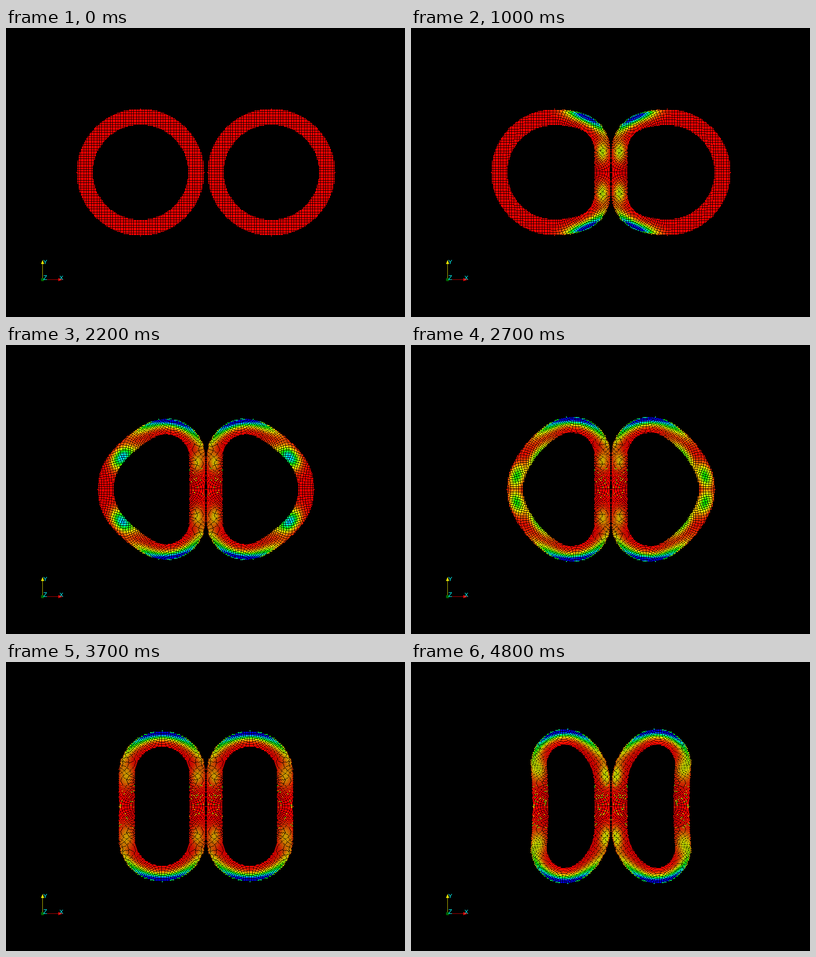
Write an HTML page with a canvas that moves like this. It is 878x638 px and loops after 4.9 s.

```html
<!DOCTYPE html>
<html lang="en">
<head>
<meta charset="utf-8">
<title>Colliding rings</title>
<style>
  html, body { margin: 0; width: 100%; height: 100%; overflow: hidden; background: #000; }
  canvas { display: block; }
</style>
</head>
<body>
<canvas width="878" height="638"></canvas>
<script>
const ctx = document.querySelector('canvas').getContext('2d');
const LOOP = 4900, MID_Y = 318.5, MIRROR = 880, CENTER = 296;
const OUTER = 140, INNER = 105, MEAN = 122.5, HALF = 17.5;
const ACROSS = 58, PITCH = OUTER / ACROSS, SAMPLES = 160;

// u runs along the upper half of a ring, 0 at the contact and 8 at the far side.
// bends: where the centre line has turned by how many degrees.
// left: x of its far end. far: place and strength of the strain wave on the free side.
const keys = [
  { step: 0, left: 173.5, bends: [[1, 22.5], [2.8, 63], [4, 90]], far: [4.6, 0] },
  { step: 1, left: 177, bends: [[1, 22.5], [2.8, 63], [4, 90]], far: [4.6, 0] },
  { step: 6, left: 194.5, bends: [[1, 0], [2.8, 74], [4, 90]], far: [4.8, 0] },
  { step: 10, left: 210.5, bends: [[1.35, 0], [4.35, 116], [5.5, 119]], far: [5.15, 1] },
  { step: 16, left: 228.5, bends: [[1.6, 0], [4.6, 121], [7.2, 157]], far: [7.4, .5] },
  { step: 22, left: 266, bends: [[1.5, 0], [4, 90], [6.5, 180]], far: [6.6, .18] },
  { step: 26, left: 280, bends: [[1.4, 0], [3.3, 57], [6.3, 184]], far: [6.5, .24] },
  { step: 29, left: 285, bends: [[1, 0], [3.4, 58], [6.2, 185]], far: [6.3, .24] }
];

const clamp = v => Math.max(0, Math.min(1, v));
const mix = (a, b, f) => Array.isArray(a) ? a.map((v, i) => mix(v, b[i], f)) : a + (b - a) * f;
const bell = (value, center, width) => Math.exp(-(((value - center) / width) ** 2));

function poseAt(step) {
  const i = Math.max(1, keys.findIndex(k => k.step >= step));
  const a = keys[i - 1], b = keys[i], f = (step - a.step) / (b.step - a.step);
  const part = name => mix(a[name], b[name], f);
  return {
    far: part('far'),
    line: centreLine(part('bends'), Math.min(CENTER + MEAN + 3.5 * step, 421), part('left'))
  };
}

// Follows the turning direction at constant speed, then fits the ends
function centreLine(bends, right, left) {
  const nodes = [[0, 0], ...bends, [8, 180]];
  const angleAt = u => {
    const i = Math.max(1, nodes.findIndex(n => n[0] >= u));
    const [a, b] = [nodes[i - 1], nodes[i]];
    return mix(a[1], b[1], (u - a[0]) / (b[0] - a[0])) * Math.PI / 180;
  };
  const line = [], ds = Math.PI * MEAN / SAMPLES;
  let x = 0, h = 0;
  for (let i = 0; i <= SAMPLES; i++) {
    const middle = angleAt(Math.min(8, (i + .5) * 8 / SAMPLES));
    line.push([x, h, angleAt(i * 8 / SAMPLES)]);
    if (i < SAMPLES) {
      x += ds * Math.sin(middle);
      h += ds * Math.cos(middle);
    }
  }
  return line.map(([px, ph, angle], i) =>
    [right - px * (right - left) / x, ph - h * i / SAMPLES, angle]);
}

// Point at material position u, offset d outwards from the centre line
function place(line, u, d) {
  const at = u / 8 * SAMPLES, i = Math.min(SAMPLES - 1, Math.floor(at));
  const [x, h, angle] = mix(line[i], line[i + 1], at - i);
  return [x + d * Math.cos(angle), h + d * Math.sin(angle)];
}

let seed = 7;
const random = () => (seed = seed * 16807 % 2147483647) / 2147483647;

const rest = poseAt(0).line;
const particles = [];
for (let j = -ACROSS; j <= ACROSS; j++) {
  for (let i = -ACROSS; i <= ACROSS; i++) {
    const x = i * PITCH, y = j * PITCH, r = Math.hypot(x, y);
    if (r > OUTER + .001 || r < INNER) continue;
    const u = Math.atan2(Math.abs(y), x) / Math.PI * 8, d = r - MEAN;
    particles.push({ x, y, r, u, d, depth: d / HALF, home: place(rest, u, d),
      chance: random(), tint: random() });
  }
}

// Strain zones at one step; they settle exponentially after the first contact
function zonesAt(step, far) {
  const settle = time => Math.exp((6 - step) / time);
  const onset = clamp((step - 1) / 5), late = clamp((step - 26) / 3);
  const zone = (u, spread, depth, thickness, strength) => ({ u, spread, depth, thickness, strength });
  return [
    zone(4.3 - 1.7 * settle(9), Math.max(.5, 1.45 - .73 * settle(7)), 1, .8, 1.35 * onset),
    zone(1.4 - .45 * settle(6), .42, .5 * late, .65, onset * (.18 + .14 * settle(5)) + .09 * late),
    zone(far[0], .52, -.7 * clamp((16 - step) / 6), .8, far[1]),
    zone(6, .85, -1, .6, .42 * clamp(1 - Math.abs(step - 16) / 6))
  ];
}

function strain(p, zones, step) {
  let w = 0;
  for (const z of zones) w += z.strength * bell(p.u, z.u, z.spread) * bell(p.depth, z.depth, z.thickness);
  if (p.r > 138.5) w *= .5;
  const speckled = step > 6 && p.u < 1 || step > 18 && p.u > 7;
  if (speckled && p.chance < .003 * (step - 6)) w = Math.max(w, .1 + .35 * p.tint);
  return clamp(w);
}

const palette = Array.from({ length: 65 }, (_, i) => `hsl(${i * 3.75}, 100%, ${i > 60 ? 45 : 50}%)`);

function triangle(color, ...points) {
  ctx.fillStyle = color;
  ctx.beginPath();
  for (const [x, y] of points) ctx.lineTo(x, y);
  ctx.fill();
}

function drawAxes() {
  ctx.fillStyle = '#c00000';
  ctx.fillRect(84, 555, 33, 1);
  ctx.fillStyle = '#c8c800';
  ctx.fillRect(80, 520, 1, 33);
  triangle('#e00000', [115, 552], [125, 555.5], [115, 559]);
  triangle('#e6e600', [77, 521], [80.5, 512], [84, 521]);
  ctx.fillStyle = '#006400';
  ctx.beginPath();
  ctx.roundRect(77, 552, 7, 7, 2);
  ctx.fill();
  ctx.fillStyle = '#00ffff';
  ctx.font = '13px "Liberation Sans", Arial, sans-serif';
  ctx.fillText('Y', 82, 521);
  ctx.fillText('X', 117.5, 556);
  ctx.font = '14px "Liberation Sans", Arial, sans-serif';
  ctx.fillText('Z', 82, 556);
}

function draw(step) {
  const { line, far } = poseAt(step), zones = zonesAt(step, far);
  ctx.fillStyle = '#000';
  ctx.fillRect(0, 0, 878, 638);
  for (const p of particles) {
    const [x, h] = place(line, p.u, p.d);
    const px = CENTER + p.x + x - p.home[0];
    const py = MID_Y + p.y + Math.sign(p.y) * (h - p.home[1]);
    const top = Math.round(py - 1);
    ctx.fillStyle = palette[Math.round(64 * strain(p, zones, step))];
    ctx.fillRect(Math.round(px - 1), top, 2, 2);
    ctx.fillRect(Math.round(MIRROR - px - 1), top, 2, 2);
  }
  drawAxes();
}

// Six poses a second, each change falling on a tenth of a second
let shown = -1;
const start = performance.now();
function tick() {
  const time = (performance.now() - start) % LOOP;
  const step = Math.floor((Math.floor(time / 100) * 100 + 34) * .006);
  if (step !== shown) draw(shown = step);
  requestAnimationFrame(tick);
}
tick();
</script>
</body>
</html>
```
